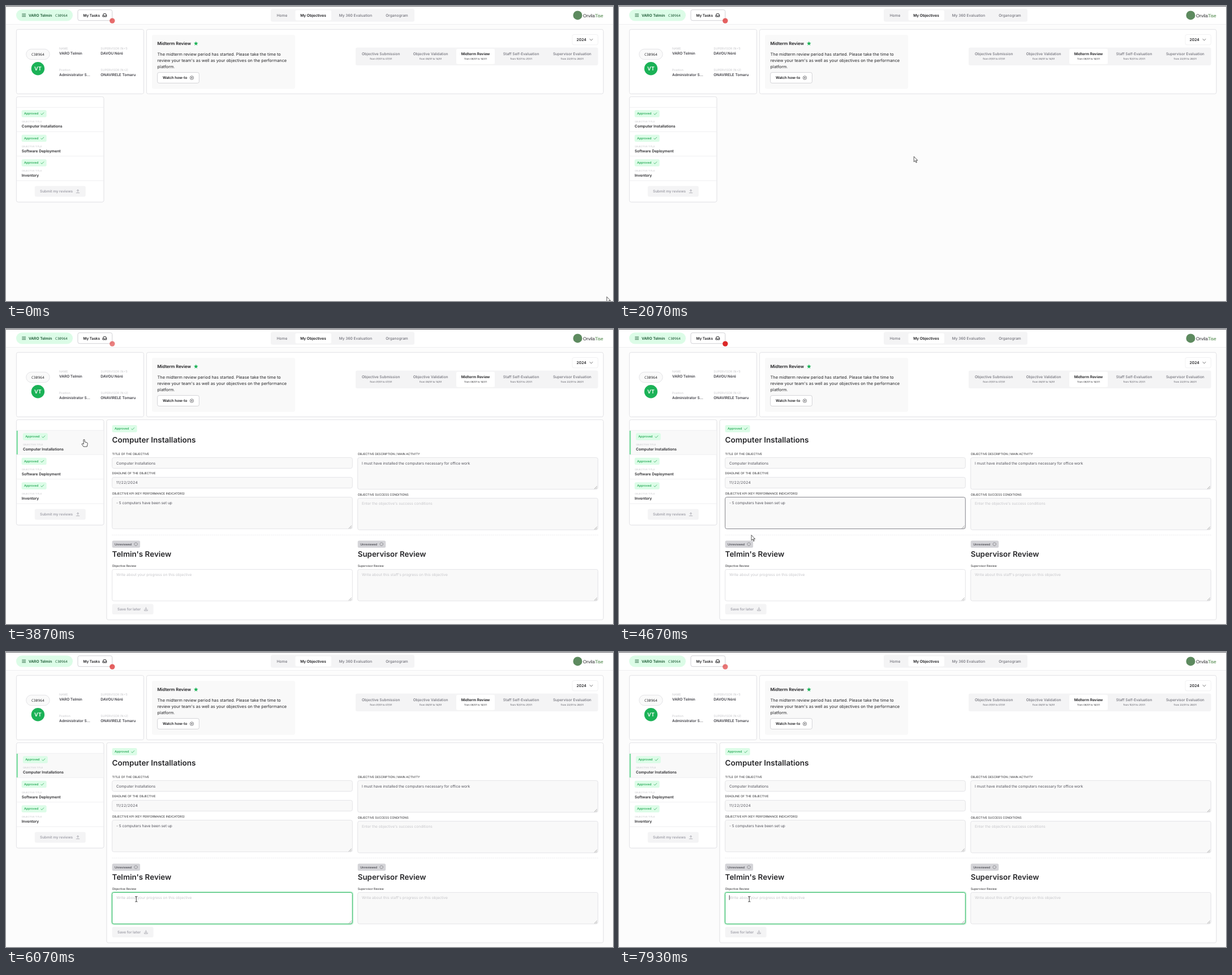
Write an HTML page that moves like this. It is 1073 px wide and 522 px high and loops after 8000 ms.

```html
<!DOCTYPE html>
<html lang="en">
<head>
<meta charset="utf-8">
<title>Objectives</title>
<style>
  html, body { margin: 0; width: 100%; height: 100%; overflow: hidden; background: #fcfcfc; }
  svg { display: block; width: 1073px; height: 522px; }
  text { font-family: Inter, sans-serif; text-rendering: geometricPrecision; white-space: pre; }
  .mono { font-family: "Noto Sans Mono", monospace; }
  .brand { font-family: "Liberation Sans", sans-serif; }
  .date { letter-spacing: .4px; }
  .card { filter: drop-shadow(0 .5px .6px rgba(0, 0, 0, .08)); }
</style>
</head>
<body>
<svg id="stage" viewBox="0 0 1073 522"></svg>
<script>
const INK = '#27272a', MUTED = '#71717a', PALE = '#a1a1aa', FAINT = '#c6c6ca';
const LINE = '#e4e4e7', SOFT = '#f4f4f5', GREEN = '#1bb257', MINT = '#dcfce7';
const PERSON = 'VARO Telmin', CODE = 'C30964';

// Drawing helpers; text is placed by the vertical centre of its capitals.
const rect = (x, y, w, h, r, fill, stroke = 'none', attrs = '') =>
  `<rect x="${x}" y="${y}" width="${w}" height="${h}" rx="${r}" fill="${fill}" stroke="${stroke}" ${attrs}/>`;
const text = (x, y, str, size = 6.5, weight = 400, fill = INK, attrs = '') =>
  `<text x="${x}" y="${y + size * .364}" font-size="${size}" font-weight="${weight}" fill="${fill}" ${attrs}>${str}</text>`;
const mid = (x, y, str, size, weight, fill, attrs = '') =>
  text(x, y, str, size, weight, fill, `text-anchor="middle" ${attrs}`);
const path = (d, stroke, width = .7, attrs = '') =>
  `<path d="${d}" fill="none" stroke="${stroke}" stroke-width="${width}" stroke-linecap="round" stroke-linejoin="round" ${attrs}/>`;
const circle = (x, y, r, fill, attrs = '') => `<circle cx="${x}" cy="${y}" r="${r}" fill="${fill}" ${attrs}/>`;
const card = (x, y, w, h) => rect(x, y, w, h, 3, '#fff', LINE, 'class="card"');
const line = (x, y, w, attrs = '') => path(`M${x} ${y}h${w}`, '#ebebee', .8, attrs);

const approved = (x, y) => rect(x, y, 44, 12.6, 2.5, MINT) +
  text(x + 4.5, y + 6.3, 'Approved', 5.4, 500, '#16a34a') +
  path(`M${x + 34.2} ${y + 6.6}l1.5 1.5l3.4-3.4`, '#16a34a');

const unreviewed = x => rect(x, 374.4, 49.5, 12.6, 2.5, '#d4d4d8') +
  text(x + 4.5, 380.7, 'Unreviewed', 5.25, 500, '#3f3f46') +
  circle(x + 42, 380.7, 2.7, 'none', 'stroke="#3f3f46" stroke-width=".7" stroke-dasharray="1.3 .8"');

function field(x, y, h, str, { fill = '#f9f9f9', color = '#52525b', id = '', cls = '' } = {}) {
  const corner = h > 30
    ? path(`M${x + 423} ${y + h - 5.4}l-4.6 4.6M${x + 423} ${y + h - 2.8}l-2 2`, '#777', .6) : '';
  return rect(x, y, 424.7, h, 3, fill, LINE, id && `id="${id}"`) +
    text(x + 7.3, y + 9.6, str, 6.57, 400, color, cls && `class="${cls}"`) + corner;
}

function header() {
  const tabs = [['Home', 488], ['My Objectives', 543], ['My 360 Evaluation', 618], ['Organogram', 691]];
  return rect(0, 0, 1073, 32, 0, '#fff') + line(0, 32.5, 1073) + rect(0, 0, 1073, .8, 0, '#3f3f46') +
    rect(18, 6.2, 100, 20.2, 10.1, MINT) +
    path('M28.6 14h6M28.6 16.3h6M28.6 18.6h6', '#14532d', .8) +
    text(40, 16.3, PERSON, 6.6, 600, '#14532d') +
    text(87, 16.3, CODE, 6.1, 500, '#14532d', 'class="mono"') +
    rect(127, 6.7, 60.7, 19, 3, '#fff', '#d4d4d8', 'class="card"') +
    text(136.5, 16.3, 'My Tasks', 6.4, 600, '#18181b') +
    path('M171.3 16.6l1.2-2.9h4l1.2 2.9v2.3h-6.4zh1.7l.7 1h1.6l.7-1h1.7', '#18181b', .9) +
    rect(468, 5.2, 254, 22.6, 3, SOFT) + rect(511.5, 7.4, 63.5, 18.2, 2.5, '#fff') +
    tabs.map(([s, x], i) => mid(x, 16.3, s, 6.6, i === 1 ? 600 : 550, i === 1 ? '#18181b' : MUTED)).join('') +
    circle(1010.5, 16.4, 8, '#5d8a5f') +
    text(1020, 16.6, 'Orvila<tspan fill="#3a7a35">Tise</tspan>', 8, 400, INK, 'class="brand"') +
    circle(187.8, 26.1, 4.7, '#dc2626', 'id="dot"');
}

function profile() {
  const facts = [
    [94, 75.4, 'NAME', PERSON], [167.3, 75.4, 'SUPERVISOR (N+1)', 'DAVOU Néré'],
    [94, 112.7, 'Position', 'Administrator S...'], [167.3, 112.7, 'SUPERVISOR (N+2)', 'ONAVIRELE Tomaru']];
  return card(18.4, 41.4, 225, 114) +
    rect(35.7, 76.2, 41.4, 18.4, 9.2, '#fafafa', LINE) +
    mid(56.4, 85.4, CODE, 6.3, 500, INK, 'class="mono"') +
    circle(56.4, 110.7, 11.7, GREEN) + mid(56.4, 110.7, 'VT', 9.2, 600, '#fff') +
    facts.map(([x, y, k, v]) => text(x, y, k, 5.25, 400, FAINT) + text(x, y + 8.7, v, 6.5, 600, '#3f3f46')).join('');
}

function period() {
  const lines = ['The midterm review period has started. Please take the time to',
    "review your team's as well as your objectives on the performance", 'platform.'];
  const steps = [['Objective Submission', '01/01 to 07/01', 662.7], ['Objective Validation', '08/01 to 14/01', 750.6],
    ['Midterm Review', '08/01 to 14/01', 830], ['Staff Self-Evaluation', '15/01 to 21/01', 910.6],
    ['Supervisor Evaluation', '22/01 to 28/01', 1000.8]];
  let star = '';
  for (let i = 0; i < 10; i++) {
    const a = i * Math.PI / 5, r = i % 2 ? 1.8 : 4;
    star += `${335.8 + r * Math.sin(a)},${66.4 - r * Math.cos(a)} `;
  }
  return card(248.5, 41.4, 807.4, 114) + rect(258, 51, 253, 95.6, 3, '#f9f9f9') +
    text(267.6, 66.3, 'Midterm Review', 7.6, 600, '#18181b') + `<polygon points="${star}" fill="${GREEN}"/>` +
    lines.map((s, i) => text(267.6, 85 + i * 11.2, s, 7.38)).join('') +
    rect(267.7, 117.6, 73.7, 18.8, 3, '#fff', '#d4d4d8', 'class="card"') +
    text(277, 127, 'Watch how-to', 6.4, 600, '#18181b') +
    circle(328.4, 127, 3.1, 'none', 'stroke="#3f3f46" stroke-width=".7"') + circle(328.4, 127, 1.1, '#3f3f46') +
    rect(1001, 50.5, 45.4, 18.3, 3, '#fff', '#f1f1f2') + text(1008.5, 59.6, '2024', 6.8, 600) +
    path('M1032 58.5l2.5 2.4l2.5-2.4', INK) +
    rect(618, 73.5, 428.6, 31.6, 3, SOFT) + rect(796, 75.7, 68, 27, 2.5, '#fff') +
    steps.map(([s, d, x], i) => mid(x, 84.6, s, 6.5, i === 2 ? 600 : 500, i === 2 ? '#18181b' : MUTED) +
      mid(x, 93.2, 'from ' + d, 4.35, 400, i === 2 ? INK : '#52525b')).join('');
}

function sidebar() {
  const rows = ['Computer Installations', 'Software Deployment', 'Inventory'];
  return card(18.4, 160.6, 154.5, 186.3) +
    rect(18.9, 180, 153.5, 42, 0, '#f9f9f9', 'none', 'id="rowBack"') +
    rect(18.4, 180, 2.6, 42, 0, '#86e0a8', 'none', 'id="rowBar"') +
    [179.4, 222.4, 265.6, 309].map(y => line(19, y, 153.5)).join('') +
    rows.map((s, i) => {
      const y = 184.2 + i * 43.5;
      return `<g${i ? '' : ' id="rowText"'}>` + approved(27.6, y) +
        text(27.8, y + 20.3, 'OBJECTIVE TITLE', 4.15, 400, FAINT) + text(27.8, y + 28.5, s, 6.58, 600) + '</g>';
    }).join('') +
    rect(50.8, 318.6, 90, 19, 3, SOFT) + text(60, 327.9, 'Submit my reviews', 6.35, 600, PALE) +
    path('M127 329.2v-4M125.2 326.8l1.8-1.8l1.8 1.8M124.2 330.7h5.6', PALE, .8);
}

function detail() {
  const L = 187.6, Rt = 621.7, hint = { color: FAINT };
  const labels = [[L, 221.2, 'TITLE OF THE OBJECTIVE'], [L, 255.4, 'DEADLINE OF THE OBJECTIVE'],
    [L, 291.2, 'OBJECTIVE KPI (KEY PERFORMANCE INDICATORS)'], [Rt, 221.2, 'OBJECTIVE DESCRIPTION / MAIN ACTIVITY'],
    [Rt, 292.8, 'OBJECTIVE SUCCESS CONDITIONS'], [L, 418.6, 'Objective Review'], [Rt, 418.6, 'Supervisor Review']];
  return '<g id="detail">' + card(178, 160.6, 877.9, 354) + approved(L, 170.1) +
    text(L, 196.5, 'Computer Installations', 13.55, 600) +
    labels.map(([x, y, s]) => text(x, y, s, 5.26)).join('') +
    field(L, 227.6, 18.9, 'Computer Installations', { id: 'field0' }) +
    field(L, 262.4, 19, '11/22/2024', { id: 'field1', cls: 'date' }) +
    field(L, 297.6, 56, '- 5 computers have been set up', { id: 'field2' }) +
    field(Rt, 227.6, 56, 'I must have installed the computers necessary for office work') +
    field(Rt, 299.4, 56, "Enter the objective's success conditions", hint) +
    line(L, 364.6, 859, 'stroke-dasharray="2 1.6"') +
    unreviewed(L) + unreviewed(Rt) +
    text(L, 398.5, "Telmin's Review", 13.45, 600) + text(Rt, 398.5, 'Supervisor Review', 13.4, 600) +
    rect(186.3, 424.3, 427.3, 58, 4, 'none', '#d3f5df', 'id="ring" stroke-width="1.8"') +
    field(L, 425.4, 55.7, 'Write about your progress on this objective', { fill: '#fff', color: FAINT, id: 'field3' }) +
    field(Rt, 425.4, 55.7, "Write about this staff's progress on this objective", hint) +
    path('M195.2 430.8v7.6', '#18181b', .8, 'id="caret"') +
    rect(L, 486.4, 73, 18.6, 3, SOFT) + text(197, 495.6, 'Save for later', 6.4, 600, PALE) +
    path('M247.4 492.6v4.2M245.6 495.2l1.8 1.8l1.8-1.8M244.6 496.8v1.7h5.6v-1.7', PALE, .8) + '</g>';
}

const pointers = `
  <g id="arrow"><path d="M0 0V9.4L2.2 7.4L3.8 10.9L5.2 10.3L3.7 6.9H6.6Z" fill="#fff" stroke="#111" stroke-width=".7"/></g>
  <g id="hand"><path d="M-1.1 .8Q0 -.7 1 .8L1.3 4.6L5 5.6Q6.4 6.2 6.2 8L5.2 12.8H-1L-4 8.6Q-3.6 6.8 -2 7.6L-.7 8.6Z" fill="#fff" stroke="#222" stroke-width=".8"/></g>
  <g id="beam">${path('M-1.7 -4.6h1.2l.5.5l.5-.5h1.2M0 -4.2v8.4M-1.7 4.6h1.2l.5-.5l.5.5h1.2', '#111', .8)}</g>`;

const stage = document.getElementById('stage');
stage.innerHTML = header() + profile() + period() + sidebar() + detail() + pointers;
const get = id => document.getElementById(id);
const show = (id, on) => get(id).setAttribute('visibility', on ? 'inherit' : 'hidden');

const LOOP = 8000, SELECT = 3600, FOCUS = 5450, BLINK = 520, HOVER_LAG = 130;
// Pointer stops: time, x, y
const stops = [[450, 1062, 514.5], [1600, 521.3, 266.3], [2200, 521.3, 266.3], [2880, 84, 166], [3250, 135, 195.3],
  [3500, 135, 195.3], [3700, 138, 195.3], [3900, 138, 195.3], [4120, 222, 250], [4640, 234, 362], [4700, 234, 367],
  [4950, 234, 424], [5000, 234, 424], [5220, 766, 486], [5430, 230.3, 437.3]];
const fieldSpans = [[227, 247], [262, 282], [297, 354], [425, 481]];
const ease = u => u * u * (3 - 2 * u);

function pointer(t) {
  const i = stops.findIndex(s => s[0] > t);
  if (i === 0) return stops[0].slice(1);
  if (i < 0) return stops[stops.length - 1].slice(1);
  const [t0, x0, y0] = stops[i - 1], [t1, x1, y1] = stops[i];
  const k = ease((t - t0) / (t1 - t0));
  return [x0 + (x1 - x0) * k, y0 + (y1 - y0) * k];
}
const onRow = ([x, y]) => x > 18 && x < 173 && y > 180 && y < 222;
const fieldAt = ([x, y], open) => open && x > 187 && x < 612 ? fieldSpans.findIndex(([a, b]) => y > a && y < b) : -1;

function draw() {
  const t = performance.now() % LOOP;
  const open = t >= SELECT, focused = t >= FOCUS;
  const pulse = ((t + LOOP - 600) % 2000) / 1000;
  get('dot').setAttribute('opacity', 1 - .5 * ease(pulse < 1 ? pulse : 2 - pulse));

  const at = pointer(t), lagged = pointer(t - HOVER_LAG);
  const shape = onRow(at) ? 'hand' : fieldAt(at, open) >= 0 ? 'beam' : 'arrow';
  for (const id of ['arrow', 'hand', 'beam']) show(id, id === shape);
  get(shape).setAttribute('transform', `translate(${at})`);

  show('detail', open);
  show('rowBar', open);
  show('rowBack', open || onRow(lagged));
  get('rowText').setAttribute('transform', `translate(${open ? 2.2 : 0})`);
  const hovered = fieldAt(lagged, open);
  fieldSpans.forEach((_, i) => get('field' + i).setAttribute('stroke',
    i === 3 && focused ? GREEN : i === hovered ? '#85858c' : LINE));
  show('ring', open && focused);
  show('caret', focused && Math.floor((t - FOCUS) / BLINK) % 2 === 0);
  requestAnimationFrame(draw);
}
draw();
</script>
</body>
</html>
```
